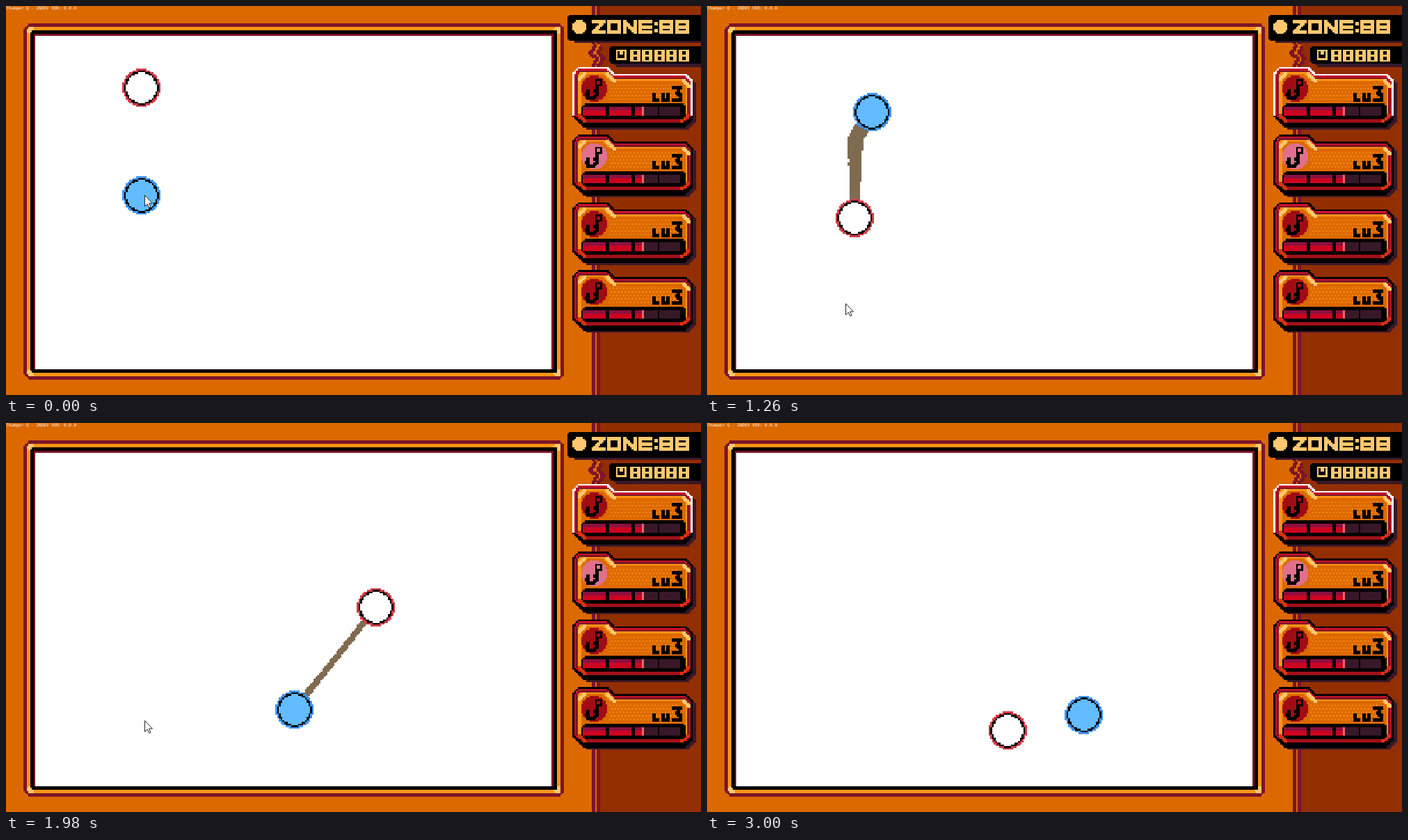
An HTML page with a canvas for the animation above (3.03 s loop, 999 px wide and 560 px high).

```html
<!DOCTYPE html>
<html lang="en">
<head>
<meta charset="utf-8">
<title>Bouncing balls</title>
<style>
html, body { margin: 0; width: 100%; height: 100%; overflow: hidden; background: #dc6900; }
canvas, svg { position: absolute; left: 0; top: 0; width: 999px; height: 560px; }
canvas { image-rendering: pixelated; }
text { font: 6px "DejaVu Sans Mono", monospace; fill: #fff; }
</style>
</head>
<body>
<canvas id="ui" width="400" height="224"></canvas>
<canvas id="fx" width="400" height="224"></canvas>
<svg viewBox="0 0 999 560">
  <text x="0" y="5">Thumper Q - INDEV VER: 0.0.0</text>
  <g id="cursor">
    <circle id="press" r="12" fill="#ff0" fill-opacity=".55"/>
    <path d="M.5 .5V16.5L4.2 13 6.8 18.5 9 17.5 6.6 12H11.5Z" fill="#fff" stroke="#222"/>
  </g>
</svg>
<script>
const $ = id => document.getElementById(id);
const ui = $('ui').getContext('2d'), fx = $('fx').getContext('2d');
const P = 2.4975; // stage pixels per art pixel
const DARK = '#7c1527', ORANGE = '#dc6900', BRIGHT = '#ff9414', PALE = '#ffc86e',
  BLACK = '#000', SHADE = '#381828', RED = '#c8102a';
let g = ui;

// All helpers fill whole art pixels, so edges stay hard.
function rect(x, y, w, h, c) {
  g.fillStyle = c;
  g.fillRect(Math.round(x), Math.round(y), Math.round(w), Math.round(h));
}
function disc(cx, cy, r, c) {
  for (let y = Math.floor(cy - r); y < cy + r; y++) {
    const d = r * r - (y + .5 - cy) ** 2;
    if (d <= 0) continue;
    const a = Math.round(cx - Math.sqrt(d)), b = Math.round(cx + Math.sqrt(d));
    rect(a, y, b - a, 1, c);
  }
}
function poly(pts, c, ox = 0, oy = 0) {
  const ys = pts.map(p => p[1]);
  for (let y = Math.floor(Math.min(...ys)); y < Math.max(...ys); y++) {
    const xs = [];
    pts.forEach(([x1, y1], i) => {
      const [x2, y2] = pts[(i + 1) % pts.length], m = y + .5;
      if ((y1 <= m) !== (y2 <= m)) xs.push(x1 + (m - y1) / (y2 - y1) * (x2 - x1));
    });
    xs.sort((a, b) => a - b);
    for (let i = 0; i + 1 < xs.length; i += 2) {
      const a = Math.round(xs[i]), b = Math.round(xs[i + 1]);
      rect(a + ox, y + oy, b - a, 1, c);
    }
  }
}
function box(x, y, r, b, k, c) {
  poly([[x + k, y], [r - k, y], [r, y + k], [r, b - k], [r - k, b], [x + k, b], [x, b - k], [x, y + k]], c);
}
function line(pts, w, h, c) {
  pts.forEach(([x, y], i) => {
    const [u, v] = pts[i + 1] || [x, y];
    const n = Math.max(1, Math.abs(u - x), Math.abs(v - y));
    for (let s = 0; s <= n; s++) rect(x + (u - x) * s / n, y + (v - y) * s / n, w, h, c);
  });
}

// Letter strokes: xy pairs, strokes split by a bar.
const strokes = {
  Z: '00 60 06 66', O: '00 60 66 06 00', N: '06 00 66 60', E: '60 00 03 63 03 06 66',
  8: '00 60 66 06 00 03 63', ':': '01|05', L: '00 03 23', v: '00 03 33 30',
  3: '00 40 23 44 47 07'
};
function glyph(ch, x, y, c, sx = 1, h = 2) {
  for (const part of strokes[ch].split('|'))
    line(part.split(' ').map(p => [x + p[0] * sx, y + +p[1]]), 2, h, c);
}

function drawBoard() {
  box(10, 10, 321, 215, 3, DARK);
  box(12, 12, 319, 213, 1, BRIGHT);
  for (const x of [12, 315]) for (const y of [12, 209]) box(x, y, x + 4, y + 4, 1, PALE);
  box(14, 14, 317, 211, 1, BLACK);
  rect(16, 16, 299, 193, DARK);
  rect(17, 17, 297, 192, '#fff');
}

function drawRail() {
  rect(342, 0, 58, 224, '#932e00');
  rect(337, 0, 5, 224, DARK);
  rect(339, 0, 1, 224, ORANGE);
  rect(337, 22, 5, 13, ORANGE);
  rect(342, 22, 3, 13, '#932e00');
  line([[338, 22], [335, 26], [339, 29], [337, 33]], 2, 2, DARK);
  line([[341, 23], [340, 26], [343, 29], [340, 33]], 2, 2, DARK);
}

function cardShape(k) {
  const j = k * .4, b = 34 - k - (k > 0);
  return [[3 + j, k], [20 - j, k], [24 - j, 4 + k], [65 - j, 4 + k], [69 - k, 8 + j],
    [69 - k, 29 - j], [64 - j, b], [6 + j, b], [k, 28 - j], [k, 4 + j]];
}
function drawCard(n) {
  const x = 326, y = 35 + 39 * n;
  const at = pts => pts.map(([a, b]) => [a + x, b + y]);
  poly(cardShape(0), SHADE, x + 2, y + 2);
  poly(cardShape(0), n ? BLACK : '#fff', x, y);
  poly([[0, 28], [69, 28], [69, 30], [64, 35], [6, 35], [0, 29]], BLACK, x, y);
  poly(cardShape(1), RED, x, y);
  poly(cardShape(2), DARK, x, y);
  poly(cardShape(2.6), BRIGHT, x, y);
  poly(cardShape(4.5), ORANGE, x, y);
  for (const p of [[[3, 6], [6, 3]], [[19, 3], [23, 7]], [[63, 7], [66, 10]]]) line(at(p), 2, 2, PALE);
  rect(x + 6, y + 29, 57, 3, '#a01018');
  for (const p of [[[3, 27], [6, 30]], [[65, 27], [62, 30]]]) line(at(p), 2, 2, '#d63410');
  for (let r = 0; r < 5; r++)
    for (let i = 0; i < 20; i++) rect(x + 21 + 2 * i + r % 2, y + 10 + 2 * r, 1, 1, '#f08208');

  disc(x + 12.5, y + 12.5, 7.4, n === 1 ? '#e0708c' : '#a00c14');
  line(at([[13, 7], [16, 7], [16, 10], [13, 10], [13, 7]]), 1, 1, BLACK);
  line(at([[13, 11], [12, 13], [13, 15], [11, 17], [8, 17], [7, 15], [8, 13]]), 2, 2, BLACK);
  glyph('L', x + 46, y + 15, BLACK);
  glyph('v', x + 51, y + 15, BLACK);
  glyph('3', x + 57, y + 11, BLACK);

  box(x + 5, y + 21, x + 65, y + 30, 2, BLACK);
  for (let i = 0; i < 4; i++) {
    const sx = x + 6 + Math.round(14.8 * i), full = [13, 13, 4, 0][i];
    rect(sx, y + 23, i < 3 ? 13 : 12, 5, SHADE);
    rect(sx, y + 23, full, 2, '#8c1040');
    rect(sx, y + 25, full, 3, '#cc0420');
    if (i === 2) rect(sx + 4, y + 23, 1, 5, '#f06468');
  }
}

function drawPlates() {
  box(325, 8, 402, 21, 2, SHADE);
  box(323, 5, 402, 20, 1, BLACK);
  disc(330, 12, 4.3, PALE);
  [...'ZONE:88'].forEach((ch, i) => glyph(ch, 337 + 9 * i - (i > 4 ? 6 : 0), 8, PALE));
  box(349, 25, 402, 35, 2, SHADE);
  box(347, 23, 402, 33, 1, BLACK);
  rect(351, 25, 6, 6, PALE);
  rect(352, 26, 4, 4, BLACK);
  rect(353, 25, 2, 3, PALE);
  for (let i = 0; i < 5; i++) glyph('8', 359 + 7 * i, 25, PALE, 4 / 6, 1);
}

rect(0, 0, 400, 224, ORANGE);
drawBoard();
drawRail();
for (let n = 0; n < 4; n++) drawCard(n);
drawPlates();
g = fx;

// Flight of the blue ball: time, x, y.
const flight = [
  [780, 195, 272], [810, 193, 198], [845, 195, 117], [865, 188, 69], [925, 72, 140],
  [1040, 329, 330], [1095, 225, 400], [1140, 212, 305], [1200, 212, 263], [1236, 214, 190],
  [1260, 237, 152], [1305, 285, 76], [1530, 757, 120], [1565, 720, 165], [1590, 691, 145],
  [1625, 708, 118], [1655, 718, 97], [1682, 705, 76], [1710, 678, 84], [2050, 346, 497],
  [2250, 181, 291], [2389, 70, 152], [2473, 137, 67], [2610, 248, 207], [2915, 478, 502],
  [3000, 542, 420]
];
function along(t) {
  const i = flight.findIndex(k => k[0] >= t);
  if (i < 1) return flight[i < 0 ? flight.length - 1 : 0].slice(1);
  const [t0, x0, y0] = flight[i - 1], [t1, x1, y1] = flight[i], f = (t - t0) / (t1 - t0);
  return [x0 + (x1 - x0) * f, y0 + (y1 - y0) * f];
}

function ball([px, py], rim, fill) {
  const x = Math.round(px / P), y = Math.round(py / 2.5);
  disc(x, y, 10.8, rim);
  disc(x, y, 9.7, BLACK);
  disc(x, y, 8.7, fill);
}

const ramp = (t, a, b) => Math.min(1, Math.max(0, (t - a) / (b - a)));

function draw(t) {
  fx.clearRect(0, 0, 400, 224);
  const lag = 120 + Math.max(0, t - 2610) * .07;
  const tail = Math.max(845, t - lag);
  if (t > 845 && t < 2450) {
    const head = 24 - 11 * ramp(t, 1260, 1710) - 4 * ramp(t, 1710, 2250);
    for (let s = tail; s <= t; s += 1) {
      const [x, y] = along(s), w = Math.max(9, head * (1 - .6 * (t - s) / lag));
      disc(x / P, y / 2.5, w / 5, '#806a50');
    }
  }
  ball(tail > 845 ? along(tail) : [195, 117], '#d03c48', '#fff');
  ball(along(t), '#3f94f4', '#62bcff');

  const pull = ramp(t, 240, 570), ease = pull * pull * (3 - 2 * pull);
  const y = 272 + 156 * ease + 150 * ramp(t, 2700, 2880) ** 2;
  $('cursor').setAttribute('transform', `translate(199 ${y})`);
  $('press').style.display = t >= 270 && t < 840 ? '' : 'none';
}

function tick() {
  draw(Math.floor(performance.now() % 3030 / 30) * 30);
  requestAnimationFrame(tick);
}
tick();
</script>
</body>
</html>
```
